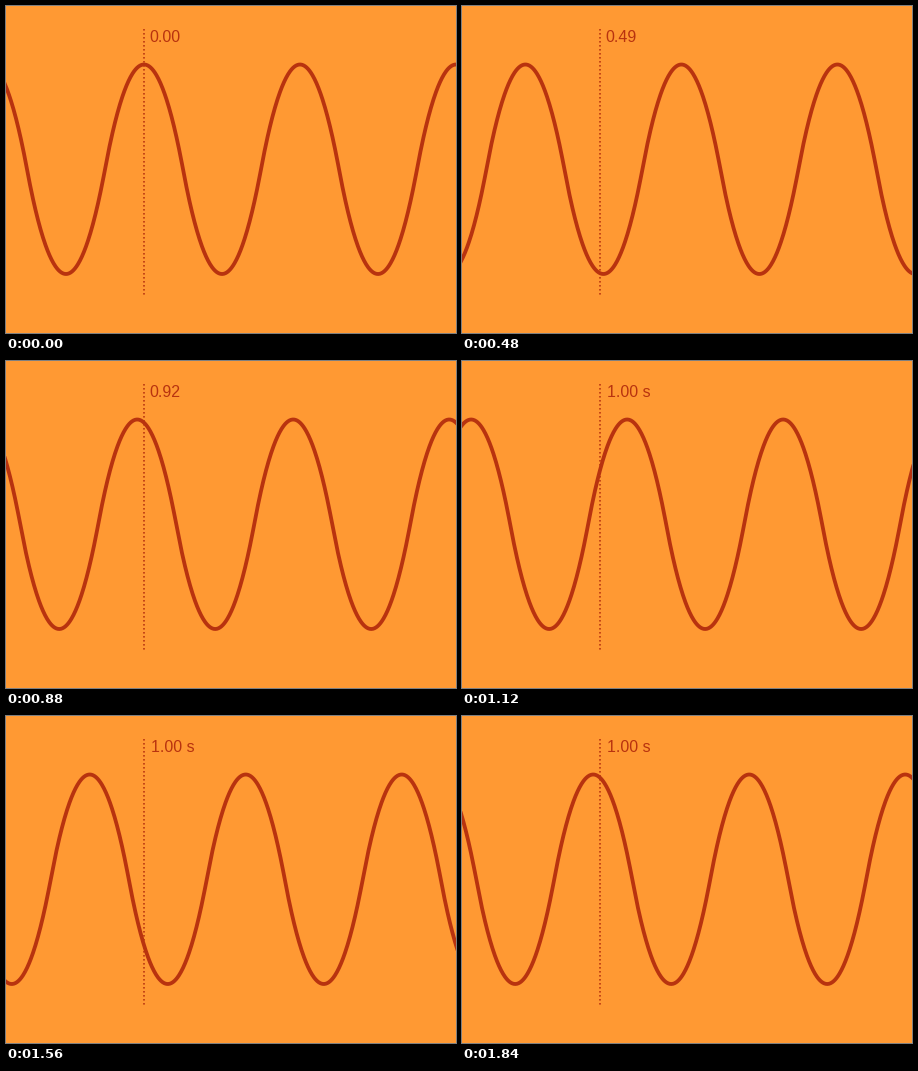
A matplotlib script for the animation above (1.88 s loop, 450 by 327 pixels).

```python
import numpy as np
import matplotlib.pyplot as plt
from matplotlib.animation import FuncAnimation

W, H, DPI = 450, 327, 100
FRAMES, INTERVAL = 47, 40
CYCLE = 23                      # steps per wave period
PERIOD, TOP, BOTTOM = 156, 58.5, 268
MARK_X = 138
ORANGE, RUST = "#ff9933", "#b8330f"


def px(n):
    """Pixels to points."""
    return n * 72 / DPI


def wave(x):
    """Alternating parabolic arcs, crest at x = 0."""
    u = (x / PERIOD + 0.25) % 1 * 4          # one arc spans two units
    side = np.where(u < 2, 1, -1)
    arc = side * (1 - (u % 2 - 1) ** 2)
    return (TOP + BOTTOM) / 2 - (BOTTOM - TOP) / 2 * arc


def label_at(i):
    if i > CYCLE:
        return "1.00 s"
    return f"{np.interp(i, [0, 6, 12, 17, 24], [0, .24, .49, .72, 1]):.2f}"


fig = plt.figure(figsize=(W / DPI, H / DPI), dpi=DPI, facecolor=ORANGE)
ax = fig.add_axes([0, 0, 1, 1])
ax.set(xlim=(0, W), ylim=(H, 0))
ax.axis("off")

xs = np.arange(-10, W + 10, 0.5)
curve, = ax.plot([], [], color=RUST, lw=px(3.8), solid_joinstyle="round")
ax.plot([MARK_X, MARK_X], [23, 291], color=RUST, lw=px(1.6),
        ls=(0, (1, 1.5)), dash_capstyle="butt", snap=False)
label = ax.text(0, 36.2, "", color=RUST, family="Liberation Sans",
                size=px(16), ha="left", va="baseline")


def draw(i):
    # the wave rests for one step when the first cycle is complete
    step = i if i <= CYCLE else i - 1
    shift = PERIOD * (step % CYCLE) / CYCLE
    curve.set_data(xs, wave(xs - MARK_X - shift))
    label.set_text(label_at(i))
    label.set_x(MARK_X + (5.6 if i <= CYCLE else 6.8))
    return curve, label


anim = FuncAnimation(fig, draw, frames=FRAMES, interval=INTERVAL,
                     repeat=True, repeat_delay=0, blit=False)
plt.show()
```
